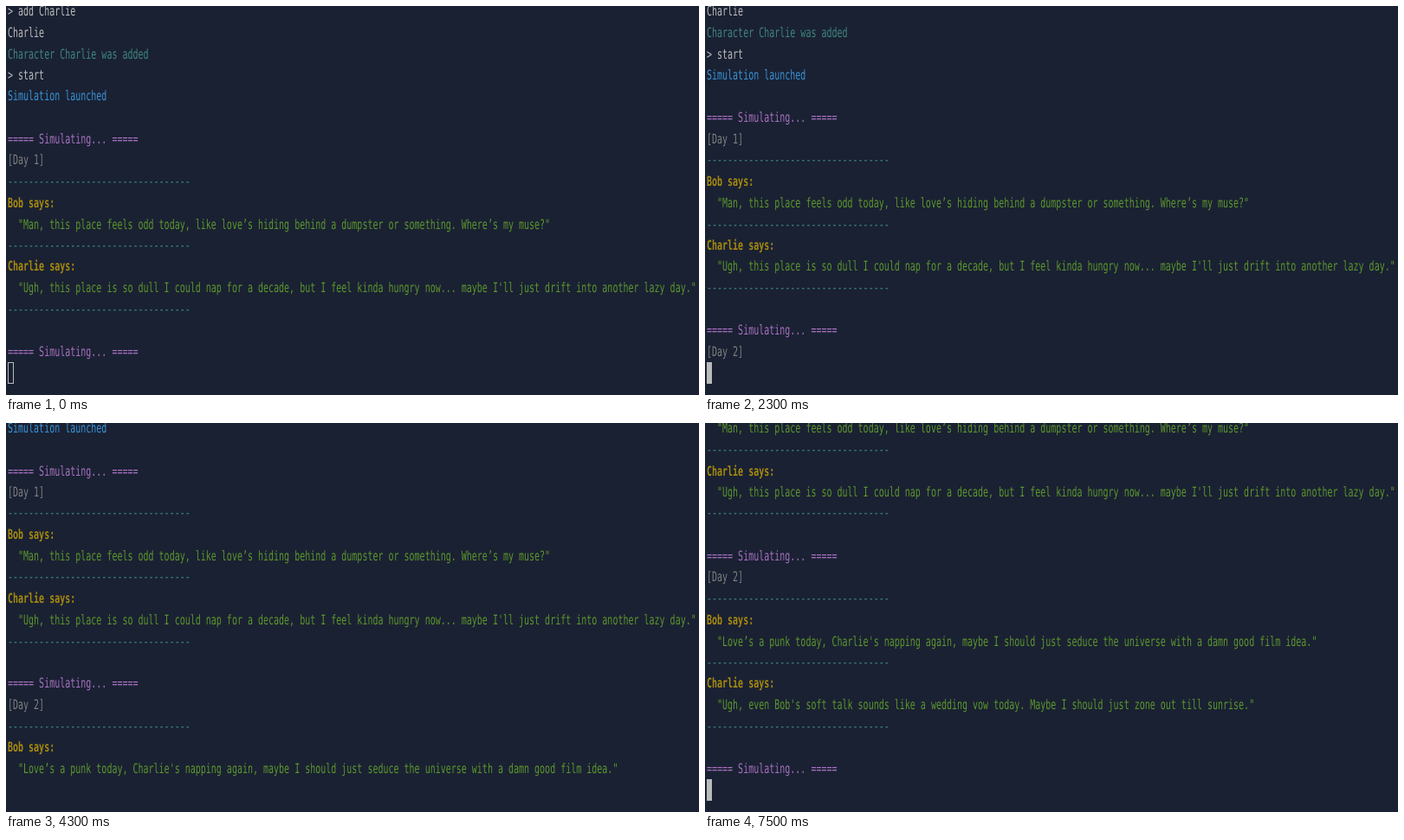
An HTML page for the animation above (8000 ms loop, 800 by 450 pixels).

```html
<!DOCTYPE html>
<html lang="en">
<head>
<meta charset="utf-8">
<title>Terminal simulation</title>
<style>
  html, body { margin: 0; width: 100%; height: 100%; overflow: hidden; background: #1a2133; }
  #stage { position: absolute; left: 0; top: 0; width: 800px; height: 450px; overflow: hidden; background: #1a2133; }
  /* the whole terminal is shown narrower than it is tall */
  #screen {
    position: absolute; left: 2px; top: -6.3px; margin: 0;
    transform: scale(.5, .775); transform-origin: 0 0;
    font: 20px "DejaVu Sans Mono", monospace;
    text-rendering: geometricPrecision; font-variant-ligatures: none;
  }
  #screen div { height: 31.78px; line-height: 31.78px; white-space: pre; }
  .plain { color: #bbbbbb; }
  .info { color: #3f857c; }
  .launch { color: #3993d4; }
  .head { color: #a771bf; }
  .day { color: #808080; }
  .name { color: #a68a0d; font-weight: bold; }
  .quote { color: #5c962c; }
  #cursor { position: absolute; left: 2px; top: 411.5px; box-sizing: border-box; width: 6.3px; height: 25px; }
  #cursor.solid { background: #bbbbbb; }
  #cursor.outline { width: 7px; height: 25.5px; border: 1px solid #bbbbbb; }
</style>
</head>
<body>
<div id="stage">
  <div id="screen"></div>
  <div id="cursor"></div>
</div>
<script>
const LOOP = 8000, ROWS = 17;
const RULE = ["info", "-".repeat(35)];
const HEAD = ["head", "===== Simulating... ====="];
const GAP = ["plain", ""];

const says = (who, text) => [["name", who + " says:"], ["quote", `  "${text}"`], RULE];
const day = (n, bob, charlie) =>
  [GAP, HEAD, ["day", `[Day ${n}]`], RULE, ...says("Bob", bob), ...says("Charlie", charlie)];

const lines = [
  ["plain", "> add Charlie"],
  ["plain", "Charlie"],
  ["info", "Character Charlie was added"],
  ["plain", "> start"],
  ["launch", "Simulation launched"],
  ...day(1,
    "Man, this place feels odd today, like love’s hiding behind a dumpster or something. Where’s my muse?",
    "Ugh, this place is so dull I could nap for a decade, but I feel kinda hungry now... maybe I'll just drift into another lazy day."),
  ...day(2,
    "Love’s a punk today, Charlie's napping again, maybe I should just seduce the universe with a damn good film idea.",
    "Ugh, even Bob's soft talk sounds like a wedding vow today. Maybe I should just zone out till sunrise."),
  GAP, HEAD
];

// [start ms, value]
const scrollSteps = [[0, 0], [2300, 1], [3300, 4], [4900, 10]];
const cursorSteps = [
  [0, "outline"], [500, "solid"], [1500, ""], [2100, "solid"], [2900, ""], [3300, "solid"],
  [4300, ""], [4900, "solid"], [5900, ""], [6400, "solid"], [6900, ""], [7500, "solid"]
];

const screenEl = document.getElementById("screen");
const cursorEl = document.getElementById("cursor");
const valueAt = (steps, t) => steps.filter(([start]) => start <= t).pop()[1];

const rows = Array.from({ length: ROWS }, () => screenEl.appendChild(document.createElement("div")));
let shown = -1;

function scrollTo(first) {
  if (first === shown) return;
  shown = first;
  rows.forEach((row, i) => [row.className, row.textContent] = lines[first + i]);
}

function draw() {
  const t = performance.now() % LOOP;
  scrollTo(valueAt(scrollSteps, t));
  cursorEl.className = valueAt(cursorSteps, t);
  requestAnimationFrame(draw);
}
draw();
</script>
</body>
</html>
```
